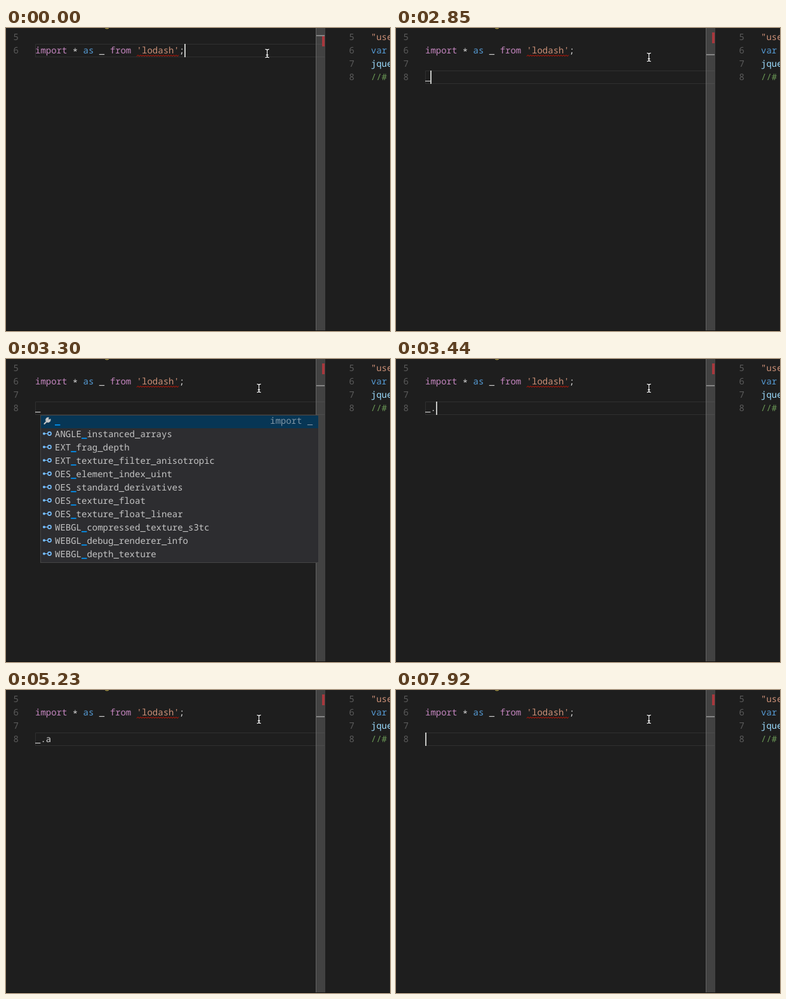
These frames come from a looping animation (605 px wide and 477 px high, 8 s). An HTML page:

```html
<!DOCTYPE html>
<html lang="en">
<head>
<meta charset="utf-8">
<title>Code editor</title>
<style>
  html, body { margin: 0; width: 100%; height: 100%; overflow: hidden; background: #1e1e1e; }
  svg { display: block; }
  text {
    font: 14px "Noto Sans Mono", "DejaVu Sans Mono", monospace;
    white-space: pre;
    text-rendering: geometricPrecision;
  }
</style>
</head>
<body>
<svg id="stage" width="605" height="477" viewBox="0 0 605 477"></svg>
<script>
const LOOP = 8000, CHAR = 8.4, LEFT = 46;
const stage = document.getElementById('stage');
const color = {
  plain: '#d4d4d4', keyword: '#c586c0', blue: '#569cd6', string: '#ce9178',
  name: '#9cdcfe', comment: '#6a9955', number: '#5a5a5a', error: '#a8383d', match: '#0097fb'
};

function add(tag, attrs, parent = stage) {
  const el = document.createElementNS('http://www.w3.org/2000/svg', tag);
  for (const key in attrs) el.setAttribute(key, attrs[key]);
  return parent.appendChild(el);
}
const rect = (x, y, width, height, fill, parent) => add('rect', { x, y, width, height, fill }, parent);

// parts: [colour, text, colour, text, ...]
function write(x, y, parts, parent) {
  const el = add('text', { x, y }, parent);
  for (let i = 0; i < parts.length; i += 2) {
    add('tspan', { fill: parts[i] }, el).textContent = parts[i + 1];
  }
  return el;
}

function squiggle(x, y, end) {
  let d = `M${x} ${y + 2.5}`;
  for (let i = 1; x + i * 2 <= end; i++) d += `L${x + i * 2} ${y + (i % 2 ? 0.5 : 2.5)}`;
  return add('path', { d, fill: 'none', stroke: '#e51400', 'stroke-width': 1 });
}

const lineTop = n => 25 + 21 * (n - 6);
const baseline = n => lineTop(n) + 15;
const column = n => LEFT + CHAR * n;
const show = (el, on) => el.setAttribute('visibility', on ? 'visible' : 'hidden');

// Current line outline
const current = add('path', { d: 'M502 .5H46.5V20.5H502', fill: 'none', stroke: '#303030' });

// Left editor
write(column(13), baseline(4), ['#c8b44e', 'g']);
write(column(27), baseline(4), [color.plain, ',']);
const numbers = [5, 6, 7, 8].map(n => write(11.6, baseline(n), [color.number, String(n)]));
write(LEFT, baseline(6), [
  color.keyword, 'import', color.plain, '   ', color.blue, 'as', color.plain, ' _ ',
  color.keyword, 'from', color.string, " 'lodash'", color.plain, ';'
]);
write(column(7), baseline(6) + 2, [color.plain, '*']);
squiggle(206, 42, 273);
const typed = write(LEFT, baseline(8), [color.plain, '']).firstChild;
const typedError = squiggle(54.5, 84, 63);

// Overview ruler with the scroll slider
rect(488, 0, 1, 477, '#646464');
rect(489, 0, 14, 477, 'rgba(121,121,121,.4)');
const mark = rect(498, 12, 4, 17, color.error);
const lineMark = rect(498, 41, 4, 16, color.error);
const rulerCaret = rect(489, 11, 13, 2, '#858585');

// Right editor
[
  [color.string, '"use strict";'], [color.blue, 'var '],
  [color.name, 'jquery'], [color.comment, '//# ']
].forEach((part, i) => {
  write(540.6, baseline(5 + i), [color.number, String(5 + i)]);
  write(575, baseline(5 + i), part);
});
rect(0, 476, 605, 1, '#111');

const caret = rect(0, 0, 2, 21, '#c4c5c3');

// Suggestion list
const popup = add('g', {});
add('rect', { x: 54.5, y: 88.5, width: 438, height: 232, fill: '#2d2d30', stroke: '#454545' }, popup);
rect(55, 89, 437, 20, '#073655', popup);
add('path', {
  d: 'M60.5 102L65.5 97M69.5 95.5A3.2 3.2 0 1 1 66.5 92.8L66 95.5L67.5 96.5Z',
  fill: '#c5c5c5', stroke: '#c5c5c5', 'stroke-width': 2, 'stroke-linecap': 'round'
}, popup);
write(416, 102, ['#8296a5', 'import _'], popup);
const items = [
  '_', 'ANGLE_instanced_arrays', 'EXT_frag_depth', 'EXT_texture_filter_anisotropic',
  'OES_element_index_uint', 'OES_standard_derivatives', 'OES_texture_float',
  'OES_texture_float_linear', 'WEBGL_compressed_texture_s3tc',
  'WEBGL_debug_renderer_info', 'WEBGL_depth_texture'
];
items.forEach((item, i) => {
  const y = 102 + 21 * i, cut = item.indexOf('_');
  const label = write(77, y, [
    '#c5c5c5', item.slice(0, cut), color.match, '_', '#c5c5c5', item.slice(cut + 1)
  ], popup);
  label.children[1].setAttribute('font-weight', 'bold');
  if (!i) return;
  const mid = y - 5.5;
  add('circle', { cx: 60, cy: mid, r: 2, fill: '#75beff' }, popup);
  add('path', { d: `M60 ${mid}H66`, stroke: '#75beff' }, popup);
  add('circle', { cx: 68.5, cy: mid, r: 2.6, fill: 'none', stroke: '#75beff', 'stroke-width': 1.6 }, popup);
});

// Mouse pointer, centred on its origin
const mouse = add('g', {});
for (const [stroke, width] of [['#000', 3], ['#fff', 1.3]]) {
  add('path', {
    d: 'M-3 -6.5Q0 -6.5 0 -4.5Q0 -6.5 3 -6.5M0 -4.5V4.5M-3 6.5Q0 6.5 0 4.5Q0 6.5 3 6.5M-1.8 2.5H1.8',
    fill: 'none', stroke, 'stroke-width': width
  }, mouse);
}

// Each step changes only the listed parts of the state
const steps = [
  [0, { line: 6, text: '', caret: true, popup: false, error: false, mouse: [411.5, 40] }],
  [150, { mouse: [401, 45] }],
  [300, { caret: false, mouse: [398.5, 46] }],
  [750, { caret: true }],
  [1350, { caret: false }],
  [1800, { caret: true }],
  [1950, { line: 7 }],
  [2100, { line: 8 }],
  [2550, { caret: false }],
  [2850, { text: '_', caret: true }],
  [3000, { popup: true }],
  [3300, { caret: false }],
  [3440, { text: '_.', caret: true, popup: false }],
  [3740, { error: true }],
  [4040, { caret: false }],
  [4490, { caret: true }],
  [4780, { text: '_.a' }],
  [5080, { error: false }],
  [5230, { caret: false }],
  [5680, { text: '_.', caret: true }],
  [5980, { error: true }],
  [6280, { caret: false }],
  [6430, { text: '_.a', caret: true, error: false }],
  [7030, { caret: false }],
  [7470, { text: '_.', caret: true }],
  [7620, { text: '_' }],
  [7920, { text: '' }]
];
const ruler = { 6: [11, 12], 7: [26, 9], 8: [41, 7] };

function draw(time) {
  const s = {};
  for (const [at, change] of steps) if (at <= time) Object.assign(s, change);
  const length = s.line === 6 ? 28 : s.text.length;
  current.setAttribute('transform', `translate(0 ${lineTop(s.line)})`);
  caret.setAttribute('x', Math.round(column(length)));
  caret.setAttribute('y', lineTop(s.line));
  show(caret, s.caret);
  numbers.forEach((el, i) => show(el, i + 5 <= s.line));
  typed.textContent = s.text;
  rulerCaret.setAttribute('y', ruler[s.line][0]);
  mark.setAttribute('y', ruler[s.line][1]);
  show(typedError, s.error);
  show(lineMark, s.error);
  show(popup, s.popup);
  mouse.setAttribute('transform', `translate(${s.mouse})`);
}

const start = performance.now();
function tick() {
  draw((performance.now() - start) % LOOP);
  requestAnimationFrame(tick);
}
tick();
</script>
</body>
</html>
```
